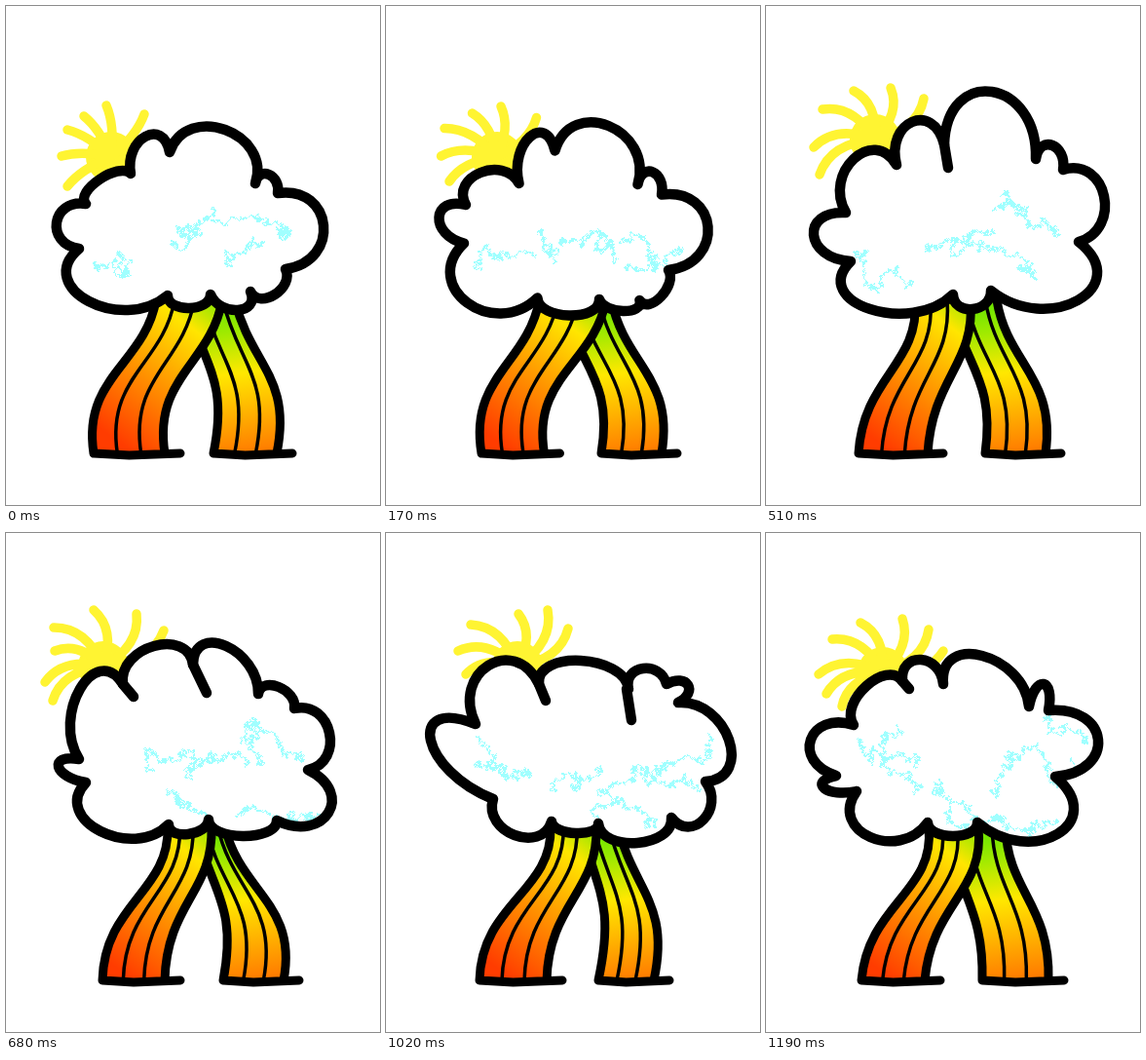
Recreate the animation shown at these times as an HTML page with a canvas. Size 384 by 512 pixels, loop 1360 ms.

```html
<!DOCTYPE html>
<html lang="en">
<head>
<meta charset="utf-8">
<title>Walking cloud</title>
<style>
html, body { margin: 0; width: 100%; height: 100%; overflow: hidden; background: #fff; }
canvas { display: block; }
</style>
</head>
<body>
<canvas id="stage" width="384" height="512"></canvas>
<script>
const ctx = document.getElementById('stage').getContext('2d');
const STEP = 170, HIP_Y = 302, FOOT_Y = 459;

// cloud: start and apex of each lobe, clockwise. sun: centre, bend, ray tips.
// left, right: hip edges, foot edges, bend. ink, tails: line ends.
const stride = {
  cloud: [75, 249, 52, 222, 82, 203, 96, 178, 128, 172, 143, 134, 168, 150, 225, 127, 256, 182, 270, 173,
    279, 192, 326, 225, 287, 270, 276, 296, 251, 293, 238, 312, 210, 296, 188, 310, 166, 297, 85, 303],
  tails: [],
  sun: [108, 155, 0.08, 63, 185, 57, 154, 63, 127, 80, 113, 103, 102, 142, 111],
  left: [154, 222, 90, 163, -24],
  right: [185, 235, 213, 278, 32],
  ink: [90, 263, 128, 263, 115, 255, 125, 276, 170, 245, 215, 210, 175, 225, 200, 232, 215, 222, 288, 236, 232, 266, 265, 242]
};
const dip = {
  cloud: [85, 238, 57, 212, 82, 205, 98, 164, 145, 192, 152, 135, 179, 147, 232, 119, 261, 184, 278, 168,
    287, 195, 335, 228, 293, 272, 289, 300, 270, 311, 249, 314, 228, 306, 188, 325, 145, 302, 82, 306],
  tails: [],
  sun: [120, 155, 0.2, 67, 175, 56, 154, 57, 124, 97, 107, 133, 104, 167, 118],
  left: [161, 230, 106, 162, -28],
  right: [178, 228, 229, 288, 21],
  ink: [106, 276, 178, 252, 195, 212, 218, 250, 192, 240, 245, 268, 258, 230, 275, 285, 262, 262, 318, 262, 255, 270, 285, 275]
};
const lift = {
  cloud: [87, 262, 49, 235, 82, 212, 90, 157, 134, 163, 150, 119, 183, 142, 232, 88, 277, 157, 294, 143,
    305, 168, 347, 195, 321, 242, 320, 302, 231, 292, 212, 311, 192, 296, 107, 311],
  tails: [183, 142, 187, 166],
  sun: [112, 137, 0.2, 55, 173, 49, 145, 58, 106, 90, 87, 128, 84, 162, 95],
  left: [153, 210, 95, 166, 10],
  right: [190, 237, 225, 287, 22],
  ink: [100, 250, 147, 285, 165, 250, 228, 235, 190, 240, 268, 272, 240, 195, 265, 215, 232, 210, 295, 232]
};
const reach = {
  cloud: [82, 256, 54, 240, 75, 232, 76, 160, 120, 155, 152, 116, 192, 135, 226, 116, 259, 165, 280, 158,
    296, 180, 332, 205, 310, 243, 331, 287, 278, 295, 243, 311, 208, 294, 187, 309, 167, 299, 97, 306],
  tails: [120, 155, 131, 168, 192, 135, 206, 164],
  sun: [100, 137, 0.2, 48, 172, 40, 153, 50, 121, 49, 97, 90, 79, 134, 83, 162, 100],
  left: [166, 211, 99, 163, 4],
  right: [195, 225, 223, 285, 30],
  ink: [142, 240, 212, 235, 165, 262, 205, 290, 190, 245, 245, 240, 240, 215, 302, 225, 255, 203, 265, 235, 235, 290, 322, 288]
};
const lean = {
  cloud: [110, 273, 46, 213, 92, 196, 105, 136, 157, 155, 200, 131, 249, 160, 264, 139, 288, 155, 310, 156,
    300, 174, 352, 212, 328, 255, 326, 294, 293, 292, 258, 318, 218, 298, 195, 308, 170, 296, 132, 310],
  tails: [157, 155, 164, 172, 247, 160, 252, 192],
  sun: [135, 137, 0.2, 82, 145, 74, 121, 74, 121, 87, 94, 136, 83, 166, 79, 187, 98],
  left: [169, 216, 96, 165, 4],
  right: [200, 238, 218, 275, 34],
  ink: [92, 208, 148, 250, 92, 238, 112, 243, 172, 262, 220, 245, 262, 246, 330, 205, 220, 270, 322, 265, 218, 292, 275, 300]
};
const settle = {
  cloud: [93, 265, 60, 262, 72, 249, 46, 212, 90, 197, 103, 157, 140, 152, 159, 130, 182, 155, 222, 126, 270, 178, 285, 155,
    290, 182, 341, 212, 297, 250, 299, 309, 217, 297, 192, 311, 166, 297, 107, 312],
  tails: [140, 152, 147, 160],
  sun: [120, 143, 0.2, 78, 178, 62, 165, 54, 145, 68, 109, 97, 92, 140, 88, 167, 99, 182, 121],
  left: [167, 218, 98, 163, 14],
  right: [190, 246, 222, 290, 4],
  ink: [98, 220, 155, 240, 135, 198, 150, 265, 172, 255, 205, 302, 195, 275, 295, 295, 250, 230, 238, 270, 248, 240, 312, 232, 285, 190, 325, 215]
};

const mean = (a, b) => Object.fromEntries(
  Object.keys(a).map(key => [key, a[key].map((v, i) => (v + b[key][i]) / 2)]));
const poses = [stride, mean(stride, dip), dip, lift, reach, mean(reach, lean), lean, settle];

function groups(list, size) {
  return Array.from({ length: list.length / size }, (_, i) => list.slice(i * size, (i + 1) * size));
}

function gradient(line, stops) {
  const g = ctx.createLinearGradient(...line);
  stops.forEach(([at, color]) => g.addColorStop(at, color));
  return g;
}

const leftFill = gradient([224, 303, 110, 455],
  [[0, '#7de800'], [0.22, '#ffe600'], [0.58, '#ff9000'], [0.95, '#ff3c00']]);
const rightFill = gradient([224, 312, 244, 468],
  [[0, '#74e600'], [0.15, '#a0ea00'], [0.42, '#ffe800'], [1, '#ff7000']]);

function stroke(path, width, color = '#000') {
  ctx.lineWidth = width;
  ctx.strokeStyle = color;
  ctx.stroke(path);
}

function fill(path, style) {
  ctx.fillStyle = style;
  ctx.fill(path);
}

function drawSun([cx, cy, bend, ...tips]) {
  const color = '#fff432', disc = new Path2D(), rays = new Path2D();
  disc.arc(cx, cy, 26, 0, 7);
  for (const [x, y] of groups(tips, 2)) {
    const dx = cx - x, dy = cy - y;
    rays.moveTo(x, y);
    rays.quadraticCurveTo(x + dx * 0.4 + dy * bend * 1.6, y + dy * 0.4 - dx * bend * 1.6, cx, cy);
  }
  fill(disc, color);
  stroke(rays, 9.5, color);
}

function drawLeg([hipA, hipB, footA, footB, bend], hipStripes, style) {
  const shape = new Path2D(), edges = new Path2D(), stripes = new Path2D();
  const span = FOOT_Y - HIP_Y, kneeY = HIP_Y + span * 0.42, shinY = FOOT_Y - span * 0.5;
  const edge = (path, hip, foot) => {
    path.moveTo(hip, HIP_Y);
    path.bezierCurveTo(hip + bend / 2, kneeY, foot + bend / 2, shinY, foot, FOOT_Y);
  };
  edge(shape, hipA, footA);
  shape.lineTo(footB, FOOT_Y);
  shape.bezierCurveTo(footB + bend / 2, shinY, hipB + bend / 2, kneeY, hipB, HIP_Y);
  edge(edges, hipA, footA);
  edge(edges, hipB, footB);
  edges.moveTo(footA, FOOT_Y);
  edges.lineTo((footA + footB) / 2, FOOT_Y + 2);
  edges.lineTo(footB + 16, FOOT_Y);
  hipStripes.forEach((k, i) =>
    edge(stripes, hipA + (hipB - hipA) * k, footA + (footB - footA) * (i + 1) / 3));
  fill(shape, style);
  stroke(stripes, 3.5);
  stroke(edges, 9);
}

// Each lobe bulges from its start, through its apex, to the next start.
function cloudPath(list) {
  const path = new Path2D(), lobes = groups(list, 4);
  path.moveTo(...lobes[0]);
  lobes.forEach(([x, y, ax, ay], i) => {
    const [nx, ny] = lobes[(i + 1) % lobes.length];
    const dx = (ax - (x + nx) / 2) * 4 / 3, dy = (ay - (y + ny) / 2) * 4 / 3;
    path.bezierCurveTo(x + dx, y + dy, nx + dx, ny + dy, nx, ny);
  });
  return path;
}

function randomSource(seed) {
  return () => (seed = (seed * 16807) % 2147483647) / 2147483647;
}

// Pixel-wide random walks pinned to both ends of each line.
function drawInk(lines, seed) {
  const random = randomSource(seed), drift = () => Math.floor(random() * 3) - 1;
  ctx.fillStyle = '#a0ffff';
  for (const [x0, y0, x1, y1] of groups(lines, 4)) {
    const n = Math.round(10 * Math.hypot(x1 - x0, y1 - y0)), walk = [[0, 0]];
    for (let i = 0; i < n; i++) walk.push([walk[i][0] + drift(), walk[i][1] + drift()]);
    const [ex, ey] = walk[n];
    walk.forEach(([x, y], i) => {
      const t = i / n;
      ctx.fillRect(Math.round(x0 + x + (x1 - x0 - ex) * t), Math.round(y0 + y + (y1 - y0 - ey) * t), 1, 1);
    });
  }
}

function draw(index) {
  const pose = poses[index], cloud = cloudPath(pose.cloud), tails = new Path2D();
  ctx.fillStyle = '#fff';
  ctx.fillRect(0, 0, 384, 512);
  drawSun(pose.sun);
  drawLeg(pose.right, [0.35, 0.75], rightFill);
  drawLeg(pose.left, [0.28, 0.58], leftFill);
  fill(cloud, '#fff');
  ctx.save();
  ctx.clip(cloud);
  drawInk(pose.ink, 7919 * (index + 3));
  ctx.restore();
  for (const [x0, y0, x1, y1] of groups(pose.tails, 4)) {
    tails.moveTo(x0, y0);
    tails.lineTo(x1, y1);
  }
  stroke(cloud, 10.5);
  stroke(tails, 10.5);
}

ctx.lineCap = ctx.lineJoin = 'round';
let shown = -1;
function tick() {
  const index = Math.floor(performance.now() / STEP) % poses.length;
  if (index !== shown) draw(shown = index);
  requestAnimationFrame(tick);
}
tick();
</script>
</body>
</html>
```
